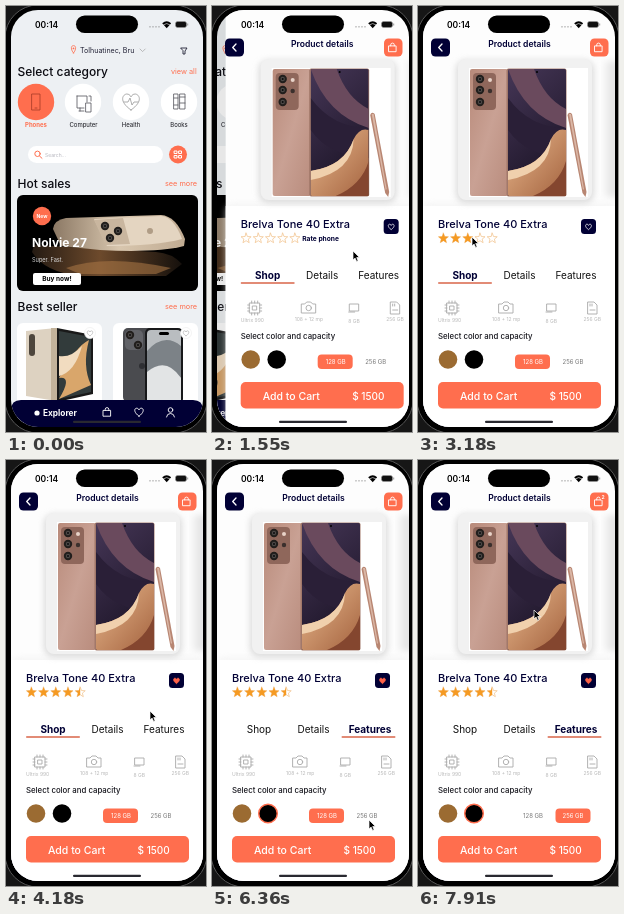
An HTML page for the animation above (8 s loop, 200 by 426 pixels).

```html
<!DOCTYPE html>
<html lang="en">
<head>
<meta charset="utf-8">
<title>Phone shop</title>
<style>
html, body { margin: 0; width: 100%; height: 100%; overflow: hidden; background: #161616; }
svg { display: block; width: 200px; height: 426px; }
text { font-family: Inter, "Open Sans", sans-serif; }
.h { font-size: 12px; font-weight: 500; fill: #010035; fill: #0b0b12; }
.b { font-weight: 700; }
.m { text-anchor: middle; }
.link { font-size: 7.3px; fill: #ff6e4e; }
.cat { font-size: 6px; text-anchor: middle; fill: #15151c; }
.spec { font-size: 5px; fill: #b7b7b7; }
.tab { font-size: 10px; fill: #111; text-anchor: middle; }
.tab.on { font-weight: 700; fill: #010035; }
.chip { font-size: 6px; text-anchor: middle; }
.line { fill: none; stroke-linecap: round; stroke-linejoin: round; }
</style>
</head>
<body>
<svg viewBox="0 0 200 426">
<defs>
  <clipPath id="screen"><rect x="5" y="4" width="192" height="417" rx="27"/></clipPath>
  <clipPath id="rated"><rect id="rate" x="19.3" y="224" width="0" height="16"/></clipPath>
  <clipPath id="banner"><rect x="11" y="189" width="181" height="96" rx="6"/></clipPath>
  <clipPath id="display"><rect x="90" y="63" width="58" height="127" rx="1.5"/></clipPath>
  <filter id="soft" x="-20%" y="-20%" width="140%" height="140%"><feGaussianBlur stdDeviation="3"/></filter>
  <linearGradient id="bronze" x2="1" y2="1"><stop stop-color="#b88a7a"/><stop offset=".5" stop-color="#c9a194"/><stop offset="1" stop-color="#b98c7d"/></linearGradient>
  <linearGradient id="gold" x2="1"><stop stop-color="#8b7864"/><stop offset=".5" stop-color="#d8c6ae"/><stop offset="1" stop-color="#c0ab92"/></linearGradient>
  <linearGradient id="glow" x2="1"><stop stop-color="#241a12"/><stop offset=".45" stop-color="#6d4a2c"/><stop offset="1" stop-color="#15100c"/></linearGradient>
  <linearGradient id="night" x2=".4" y2="1"><stop stop-color="#453656"/><stop offset="1" stop-color="#1d1528"/></linearGradient>
  <linearGradient id="sand" x2="1" y2="1"><stop stop-color="#e9b98e"/><stop offset="1" stop-color="#a4633f"/></linearGradient>
  <linearGradient id="side" x2="1"><stop stop-color="#f4f4f4"/><stop offset="1" stop-color="#dcdcdc"/></linearGradient>
  <path id="heart" d="M0 4.2C-6-.2-4.6-3.8-2.3-3.8-1-3.8 0-2.6 0-2 0-2.6 1-3.8 2.3-3.8 4.6-3.8 6-.2 0 4.2Z"/>
  <path id="bag" d="M-3.6-1.6H3.6V4.2H-3.6ZM-1.8-1.6V-2.6A1.8 1.8 0 0 1 1.8-2.6V-1.6"/>
  <g id="lens"><circle r="4.2" fill="#211e1c"/><circle r="2.2" fill="#4b4846"/><circle r="1" fill="#0b0b0d"/></g>
</defs>

<rect x="-1" y="-1" width="202" height="428" rx="33" fill="#000" stroke="#555"/>

<g clip-path="url(#screen)">
  <g id="home">
    <rect x="5" y="4" width="192" height="417" fill="#edf0f3"/>
    <path class="line" stroke="#ff6e4e" stroke-width=".8" d="M67.5 47C64.5 43.5 64.7 39.6 67.5 39.6S70.5 43.5 67.5 47Z"/>
    <circle cx="67.5" cy="42.4" r=".9" fill="#ff6e4e"/>
    <text x="74" y="46.6" font-size="7.1" fill="#222236">Tolhuatinec, Bru</text>
    <path class="line" stroke="#aaa" stroke-width=".8" d="M134 43l2.6 2.6L139.200 43"/>
    <path class="line" stroke="#222236" stroke-width=".9" d="M175 42H181L179 45V48H177V45Z"/>

    <text class="h" x="11.500" y="69.500">Select category</text>
    <text class="link" x="165" y="68">view all</text>
    <circle cx="30" cy="96" r="18.200" fill="#ff6e4e"/>
    <g fill="#fff"><circle cx="77" cy="96" r="18.200"/><circle cx="125" cy="96" r="18.200"/><circle cx="173" cy="96" r="18.200"/></g>
    <g class="line" stroke="#55555c" stroke-width=".8">
      <path stroke="#a83c28" d="M26 88H34V104H26ZM29 102H31"/>
      <path d="M71 90H81V96M71 90V102H78M73 105H78M80 97H85V106H80ZM74 102V105M83 90H85V95"/>
      <path stroke="#999" d="M125 104C112 95 117 88 121 88 124 88 125 91 125 91S126 88 129 88C133 88 138 95 125 104ZM118 96H122L124 92 126 99 128 96H132"/>
      <path d="M168 88H172V103H168ZM174 88H179V103H174ZM168 92H172M168 99H172M174 91H179M174 97H179"/>
    </g>
    <text class="cat b" x="30" y="121" style="fill:#ff6e4e">Phones</text>
    <text class="cat" x="77.500" y="121">Computer</text>
    <text class="cat" x="125" y="121">Health</text>
    <text class="cat" x="173" y="121">Books</text>

    <rect x="22" y="140" width="135" height="17" rx="8.500" fill="#fff"/>
    <g class="line" stroke="#ff6e4e"><circle cx="31.500" cy="147.800" r="2.700"/><path d="M33.500 150L36 152.300"/></g>
    <text x="39" y="150.500" font-size="5" fill="#b5b5bd">Search...</text>
    <circle cx="172" cy="148.500" r="9" fill="#ff6e4e"/>
    <path class="line" stroke="#fff" d="M168.500 145H171V147.500H168.500ZM173 145H175.500V147.500H173ZM168.500 149.500H171V152H168.500ZM173 149.500H175.500V152H173Z"/>

    <text class="h" x="11.500" y="182">Hot sales</text>
    <text class="link" x="159" y="180">see more</text>
    <g clip-path="url(#banner)">
      <rect x="11" y="189" width="181" height="96"/>
      <path fill="url(#glow)" d="M28 239L150 246Q166 247 176 258L160 270 74 270Q38 266 26 246Z"/>
      <path fill="#a57443" d="M60 262Q100 248 165 262L150 268H74Z" opacity=".6"/>
      <path fill="url(#gold)" d="M47 223Q48 214 60 212L155 209Q170 210 179 233L178 240Q150 247 94 244L55 240Z"/>
      <path fill="#e4d5c1" d="M88 213L155 210Q168 211 176 233 150 240 101 240Z"/>
      <path fill="#c9b69f" d="M88 214L117 212 124 238 100 239Z"/>
      <use href="#lens" x="99" y="220"/><use href="#lens" x="112" y="225"/><use href="#lens" x="104" y="232"/>
      <circle cx="144" cy="225" r="3" fill="#b09d86"/>
    </g>
    <circle cx="36" cy="210" r="9.200" fill="#ff6e4e"/>
    <text class="b m" x="36" y="211.800" font-size="5" fill="#fff">New</text>
    <text class="b" x="26" y="241" font-size="12" fill="#fff">Nolvie 27</text>
    <text x="26" y="255.500" font-size="5.600" fill="#ddd">Super. Fast.</text>
    <rect x="27" y="267" width="48" height="12" rx="2" fill="#fff"/>
    <text class="b m" x="51" y="275.400" font-size="6.500">Buy now!</text>

    <text class="h" x="11.500" y="305">Best seller</text>
    <text class="link" x="159" y="303">see more</text>
    <rect x="11" y="317" width="85" height="100" rx="6" fill="#fff"/>
    <rect x="107" y="317" width="85" height="100" rx="6" fill="#fff"/>
    <path fill="#ddd2c1" d="M20 325L50 322V395L20 390Z"/>
    <path fill="#c3b39b" d="M45 322H51V395H45Z"/>
    <rect x="23" y="328" width="6" height="22" rx="3" fill="#4d463d"/>
    <path fill="#191919" d="M51 322L87 329V388L51 396Z"/>
    <path fill="#323b3b" d="M53 325L85 331V386L53 393Z"/>
    <path fill="#d9a66b" d="M53 372Q70 340 83 334 76 360 85 379L53 393Q67 370 53 372Z"/>
    <path fill="#f1dcc0" d="M53 350Q65 352 76 340 69 366 53 370Z"/>
    <rect x="117" y="322" width="36" height="74" rx="5" fill="#4a4b4f"/>
    <rect x="119" y="324" width="18" height="20" rx="5" fill="#626368"/>
    <use href="#lens" x="124" y="329"/><use href="#lens" x="132" y="339"/>
    <circle cx="136" cy="360" r="3" fill="#2e2f33"/>
    <rect x="139" y="322" width="38" height="76" rx="5" fill="#17181a"/>
    <rect x="141" y="324" width="34" height="74" rx="4" fill="#b9bdc0"/>
    <path fill="#7c8287" d="M141 345Q158 326 175 340V372Q155 350 141 385Z"/>
    <path fill="#e2e4e5" d="M141 366Q160 350 175 372V398H141Z"/>
    <rect x="153" y="326" width="10" height="3" rx="1.500"/>
    <g fill="#fff" stroke="#888" stroke-width=".7">
      <circle cx="84" cy="327" r="5.500" stroke="#eee"/><circle cx="180" cy="327" r="5.500" stroke="#eee"/>
      <use href="#heart" transform="translate(84 327.300) scale(.65)"/><use href="#heart" transform="translate(180 327.300) scale(.65)"/>
    </g>

    <path fill="#010035" d="M5 421V404Q5 394 15 394H187Q197 394 197 404V421Z"/>
    <circle cx="31" cy="407" r="2.600" fill="#fff"/>
    <text class="b" x="37" y="410" font-size="8.300" fill="#fff">Explorer</text>
    <g class="line" stroke="#fff" stroke-width=".9">
      <use href="#bag" x="101" y="406"/><use href="#heart" x="133" y="406"/>
      <circle cx="164.500" cy="404" r="2.300"/><path d="M160.500 411Q161 407.500 164.500 407.500T168.500 411"/>
    </g>
  </g>
  <rect id="dim" x="5" y="4" width="192" height="417" opacity="0"/>

  <g id="detail">
    <rect x="5" y="4" width="195" height="417" fill="#fdfdfd"/>
    <rect x="5" y="198" width="195" height="223" rx="8" fill="#eee" filter="url(#soft)" opacity=".6"/>
    <rect x="5" y="200" width="195" height="223" fill="#fff"/>
    <text class="m" x="101.500" y="41" font-size="8.600" font-weight="600" fill="#010035">Product details</text>
    <rect x="186" y="55" width="14" height="136" fill="url(#side)" filter="url(#soft)"/>
    <rect x="38" y="54" width="138" height="143" rx="9" fill="#d4d4d4" filter="url(#soft)" opacity=".8"/>
    <rect x="40" y="53" width="134" height="141" rx="8" fill="#f1f1f1"/>
    <rect id="blank" x="43" y="60" width="127" height="128" rx="6" fill="#d2d2d2" filter="url(#soft)"/>
    <g id="photo">
      <rect x="51" y="62" width="119" height="129" fill="#fff"/>
      <rect x="52" y="63" width="38" height="127" rx="2" fill="url(#bronze)"/>
      <rect x="55" y="67" width="23" height="37" rx="4" fill="#8f675b"/>
      <use href="#lens" x="62" y="73"/><use href="#lens" x="62" y="84"/><use href="#lens" x="62" y="96"/>
      <circle cx="72" cy="74" r="2" fill="#e8d3c8"/><circle cx="72" cy="85" r="2.200" fill="#3b302d"/>
      <rect x="88.500" y="62.500" width="60" height="128" rx="2" fill="#a1786a"/>
      <g clip-path="url(#display)">
        <rect x="90" y="63" width="58" height="127" fill="url(#night)"/>
        <path fill="#6a4a5d" d="M90 63H116Q126 92 148 103V122Q106 109 90 63Z"/>
        <path fill="#2a1f37" d="M90 92Q112 122 148 122V152Q108 150 90 124Z"/>
        <path fill="url(#sand)" d="M90 165Q124 160 133 133 139 121 148 124V190H90Z"/>
        <path fill="#f0d0ad" d="M90 165Q124 160 133 133 132 166 90 174Z"/>
        <path fill="#84462f" d="M115 190Q141 179 148 155V190Z"/>
      </g>
      <circle cx="119" cy="66" r="1"/>
      <path fill="#b88672" d="M149.500 109Q151 105 154 108L168.500 186 167.500 191 164.500 187Z"/>
      <path fill="#dbb7a6" d="M151 108L153 108 166 183 165 184Z"/>
    </g>

    <text x="20" y="222" font-size="11" font-weight="500" fill="#010035">Brelva Tone 40 Extra</text>
    <rect x="163" y="213" width="15" height="15" rx="3.500" fill="#010035"/>
    <use id="fav" href="#heart" transform="translate(170.500 220.800) scale(.68)" stroke-width="1.100"/>
    <g id="empty" class="line" stroke="#f3c795" stroke-width=".8"></g>
    <g id="full" fill="#f59a23" clip-path="url(#rated)"></g>
    <text id="ask" class="b" x="81.500" y="235" font-size="6.700" fill="#010035">Rate phone</text>

    <text class="tab" x="47" y="273">Shop</text>
    <text class="tab" x="101.500" y="273">Details</text>
    <text class="tab" x="158" y="273">Features</text>
    <rect id="bar" y="276.300" width="54" height="1.500" rx=".7" fill="#d9654a"/>

    <g class="line" stroke="#aaa" stroke-width=".9">
      <path d="M29 297H39V307H29ZM32 300H36V304H32ZM31 297V295M34 297V295M37 297V295M31 307V309M34 307V309M37 307V309M29 299H27M29 302H27M29 305H27M39 299H41M39 302H41M39 305H41"/>
      <path d="M81 298H84L86 296H90L92 298H95V307H81Z"/><circle cx="88" cy="302" r="2.700"/>
      <path d="M129 298H138V305H129ZM128 306H134"/>
      <path d="M170 296H176L179 299V308H170ZM172 298V300M174 298V300M172 304H177"/>
    </g>
    <text class="spec" x="20" y="316.300">Ultrix 990</text>
    <text class="spec" x="74" y="315">108 + 12 mp</text>
    <text class="spec" x="127.500" y="316.500">8 GB</text>
    <text class="spec" x="165.500" y="315">256 GB</text>

    <text x="20" y="333" font-size="7.800" font-weight="500" fill="#15151c">Select color and capacity</text>
    <circle class="dot" cx="30" cy="353.500" r="9.300" fill="#9b6b32"/>
    <circle class="dot" cx="56" cy="353.500" r="9.300"/>
    <rect id="pick" y="348.500" width="35" height="14.500" rx="4" fill="#ff6e4e"/>
    <text class="chip" x="115" y="358">128 GB</text>
    <text class="chip" x="155" y="358">256 GB</text>
    <g id="buy">
      <rect x="20" y="376" width="163" height="26.500" rx="5" fill="#ff6e4e"/>
      <text x="42" y="393.500" font-size="10.500" font-weight="500" fill="#fff">Add to Cart</text>
      <text x="131.500" y="393.500" font-size="10" font-weight="500" fill="#fff">$ 1500</text>
    </g>
  </g>

  <g id="buttons">
    <rect x="13" y="32.500" width="19" height="18" rx="4.500" fill="#010035"/>
    <path class="line" stroke="#fff" stroke-width="1.300" d="M24 38L20.700 41.500 24 45"/>
    <rect x="172" y="32.500" width="18.500" height="18" rx="4.500" fill="#ff6e4e"/>
    <use href="#bag" x="180.500" y="41.500" class="line" stroke="#fff" stroke-width=".9"/>
    <circle id="spot" cx="185" cy="37.500" r="2.700" fill="#ff6e4e"/>
    <text id="count" class="m b" x="185" y="39.300" font-size="5" fill="#fff"></text>
  </g>

  <text x="29" y="21.700" font-size="8.500" font-weight="600">00:14</text>
  <path class="line" stroke="#777" stroke-width="1.300" stroke-dasharray="0 3" d="M144 20.800H153.500"/>
  <path d="M160.700 22.200L156.200 17.200Q160.700 13.400 165.200 17.200Z"/>
  <path class="line" stroke="#fff" stroke-width=".6" d="M157.600 18.700Q160.700 16.200 163.800 18.700"/>
  <rect x="169.500" y="15.500" width="11" height="6" rx="2" fill="#111" stroke="#999" stroke-width=".6"/>
  <rect x="181.200" y="17.500" width="1" height="2" fill="#999"/>
  <rect x="67" y="414.700" width="68" height="2.300" rx="1.100" fill="#292930"/>
</g>
<rect x="70" y="9.500" width="62" height="17.500" rx="8.700"/>
<path id="cursor" d="M0 0V9L2.100 7.100 3.600 10.400 5.100 9.700 3.700 6.500H6.500Z" stroke="#fff" stroke-width=".7"/>
</svg>

<script>
const $ = id => document.getElementById(id);
const all = sel => [...document.querySelectorAll(sel)];
const set = (el, attrs) => { for (const k in attrs) el.setAttribute(k, attrs[k]); };
const clamp = v => Math.min(1, Math.max(0, v));
const LOOP = 8000, FPS = 11, PITCH = 12.2, STAR_X = 19.3;

// time, x, y of the pointer tip
const path = [
  [0, 141, 245], [2005, 141, 245], [2270, 38, 238], [2420, 24, 231], [2640, 29, 231],
  [2820, 36, 231], [3180, 54, 231], [3280, 54, 231], [3500, 73, 232], [3800, 172, 221],
  [3950, 182, 236], [4090, 174, 223], [4181, 144, 251], [4400, 104, 268], [4545, 104, 268],
  [4730, 160, 271], [4915, 160, 271], [5360, 26, 352], [5540, 26, 352], [5730, 54, 352],
  [5910, 54, 352], [6360, 157, 360], [6640, 157, 360], [6900, 100, 385], [7450, 100, 385],
  [7909, 116, 150]
];

function pointer(t) {
  const i = path.findIndex(p => p[0] > t);
  if (i < 0) return path[path.length - 1].slice(1);
  const [t0, x0, y0] = path[i - 1], [t1, x1, y1] = path[i];
  const u = (t - t0) / (t1 - t0), e = u * u * (3 - 2 * u);
  return [x0 + (x1 - x0) * e, y0 + (y1 - y0) * e];
}

function star(cx, cy) {
  let pts = "";
  for (let i = 0; i < 10; i++) {
    const r = i % 2 ? 2.3 : 5.3, a = i * Math.PI / 5;
    pts += `${cx + r * Math.sin(a)},${cy - r * Math.cos(a)} `;
  }
  return `<polygon points="${pts}"/>`;
}
for (let i = 0; i < 5; i++) {
  const shape = star(STAR_X + (i + .5) * PITCH, 232.4);
  $("empty").innerHTML += shape;
  $("full").innerHTML += shape;
}

const press = (t, start) => t < start ? 0 : clamp(1 - (t - start) / 220);

function draw(t) {
  const slide = t < 1275 ? 0 : t > 1815 ? 1 : 1 - Math.exp(-(t - 1273) / 88);
  set($("home"), { transform: `translate(${-57 * slide} 0)` });
  set($("dim"), { opacity: .1 * slide });
  set($("detail"), { transform: `translate(${192 * (1 - slide)} 0)`, visibility: slide ? "visible" : "hidden" });
  set($("buttons"), { opacity: clamp(slide * 1.6) });
  set($("photo"), { opacity: +(t > 1500) });
  set($("blank"), { opacity: +(t <= 1500) });

  const [x, y] = pointer(t);
  set($("cursor"), { transform: `translate(${x} ${y})`, opacity: clamp((t - 727) / 455) * (t > 800) });

  // dragging over the stars rates in half steps
  const dragX = pointer(Math.min(t, 3500))[0];
  const rating = t < 2420 ? 0 : Math.ceil((dragX - STAR_X) / PITCH * 2) / 2;
  set($("rate"), { width: rating * PITCH });
  set($("ask"), { opacity: +!rating });

  const liked = t > 3800;
  set($("fav"), { fill: liked ? "#ff6248" : "none", stroke: liked ? "#ff6248" : "#fff" });

  const tab = t < 4450 ? 0 : t < 4800 ? 1 : 2;
  all(".tab").forEach((el, i) => el.classList.toggle("on", i === tab));
  set($("bar"), { x: [20, 75, 129.5][tab] });

  const color = t < 5440 ? -1 : t < 5800 ? 0 : 1;
  all(".dot").forEach((el, i) => set(el, { stroke: i === color ? "#ff6e4e" : "none", "stroke-width": 1.5 }));

  const size = +(t > 6600);
  set($("pick"), { x: size ? 137.5 : 97 });
  all(".chip").forEach((el, i) => set(el, { fill: i === size ? "#fff" : "#777" }));

  set($("buy"), { opacity: 1 - .5 * Math.max(press(t, 6880), press(t, 7440)) });
  const items = (t > 6950) + (t > 7500);
  $("count").textContent = items || "";
  set($("spot"), { opacity: +(items > 0) });
}

const begin = performance.now();
function tick() {
  const t = (performance.now() - begin) % LOOP;
  draw(Math.floor((t + 5) * FPS / 1000) * 1000 / FPS % LOOP);
  requestAnimationFrame(tick);
}
tick();
</script>
</body>
</html>
```
